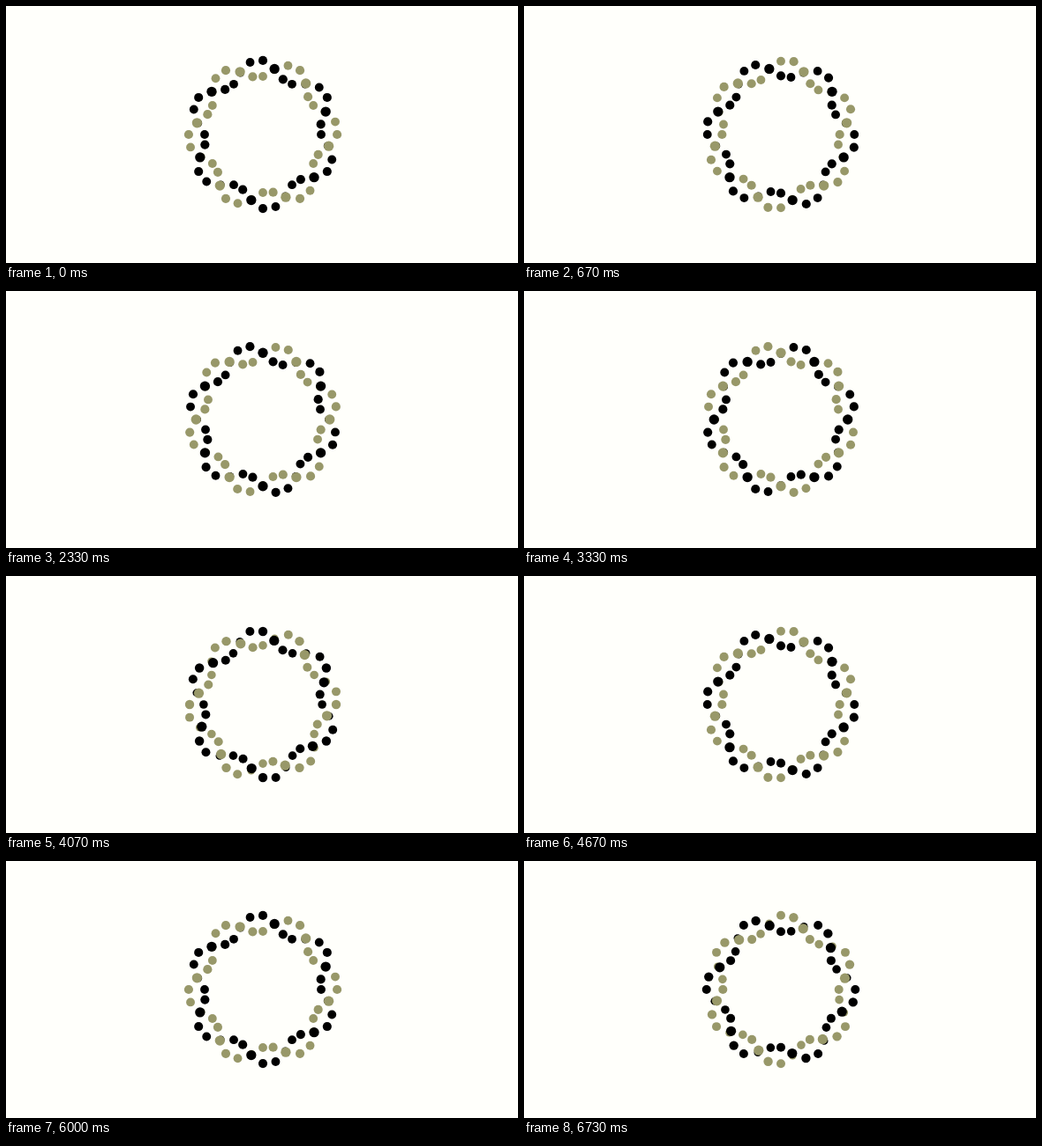
Write an HTML page with a canvas that moves like this. It is 580x292 px and loops after 6.79 s.

```html
<!DOCTYPE html>
<html lang="en">
<head>
<meta charset="utf-8">
<title>Rolling ring</title>
<style>
  html, body { margin: 0; width: 100%; height: 100%; overflow: hidden; background: #fffffb; }
  canvas { display: block; width: 580px; height: 292px; }
</style>
</head>
<body>
<canvas id="stage"></canvas>
<script>
const W = 580, H = 292, CX = 291, CY = 146;
const LOOP = 6790, SPOKES = 36, TWISTS = 6;
const RING = 75, TUBE = 10, VIEW = 1000;
const DOT = 5, SWELL = 0.65;
const STRANDS = [
  { color: '#000', offset: 0 },
  { color: '#989869', offset: Math.PI }
];
const rad = deg => deg * Math.PI / 180;

const canvas = document.getElementById('stage');
const ctx = canvas.getContext('2d');
const dpr = window.devicePixelRatio || 1;
canvas.width = W * dpr;
canvas.height = H * dpr;
ctx.scale(dpr, dpr);

// 15 steps per second, on 10 ms ticks: 70, 130, 200, ...
function stepAt(ms) {
  const t = ms % LOOP, part = t % 200;
  return Math.floor(t / 200) * 3 + (part >= 70) + (part >= 130);
}

// Two strands wind around a ring; dots swell only near the very front.
function placeDots(roll) {
  const dots = [];
  for (let i = 0; i < SPOKES; i++) {
    const angle = i * 2 * Math.PI / SPOKES;
    for (const { color, offset } of STRANDS) {
      const phase = TWISTS * angle + roll + offset;
      const depth = Math.sin(phase);
      const r = (RING + TUBE * Math.cos(phase)) / (1 - TUBE * depth / VIEW);
      dots.push({
        x: CX + r * Math.sin(angle),
        y: CY - r * Math.cos(angle),
        size: DOT + SWELL * depth ** 3,
        depth, color
      });
    }
  }
  return dots.sort((a, b) => a.depth - b.depth);
}

function draw(step) {
  ctx.clearRect(0, 0, W, H);
  for (const { x, y, size, color } of placeDots(rad(30 + 12 * step))) {
    ctx.fillStyle = color;
    ctx.beginPath();
    ctx.arc(x, y, size, 0, 2 * Math.PI);
    ctx.fill();
  }
}

const start = performance.now();
function tick() {
  draw(stepAt(performance.now() - start));
  requestAnimationFrame(tick);
}
tick();
</script>
</body>
</html>
```
